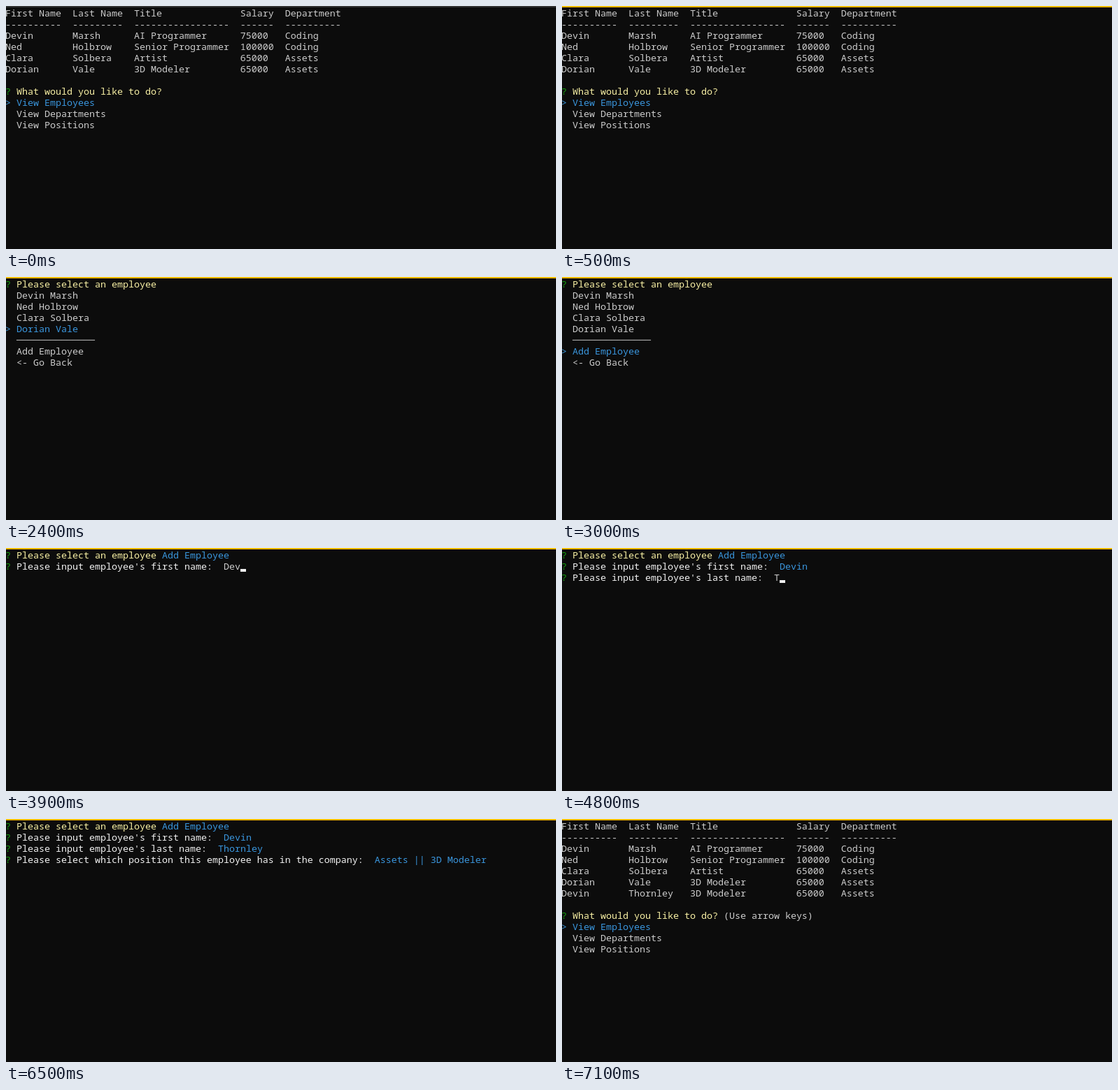
Recreate the animation shown at these times as an HTML page. Size 786 by 348 pixels, loop 7.2 s.

```html
<!DOCTYPE html>
<html lang="en">
<head>
<meta charset="utf-8">
<title>Employee terminal</title>
<style>
  html, body { margin: 0; width: 100%; height: 100%; overflow: hidden; background: #0c0c0c; }
  #edge { position: absolute; top: 0; left: 0; width: 100%; height: 2px; }
  #screen {
    position: absolute; top: 2px; left: -1px; margin: 0; color: #ccc;
    font: 13.3333px/16px "Noto Sans Mono", "DejaVu Sans Mono", monospace;
    font-variant-ligatures: none;
  }
  .mark { color: #13a10e; }
  .ask { color: #f9f1a5; }
  .field { color: #f2f2f2; }
  .pick { color: #3a96dd; }
  .cursor { display: inline-block; width: 8px; height: 4px; background: #f2f2f2; vertical-align: -3px; }
</style>
</head>
<body>
<div id="edge"></div>
<pre id="screen"></pre>
<script>
const LOOP = 7200;
const edge = document.getElementById('edge');
const screen = document.getElementById('screen');

const staff = [
  ['Devin', 'Marsh', 'AI Programmer', '75000', 'Coding'],
  ['Ned', 'Holbrow', 'Senior Programmer', '100000', 'Coding'],
  ['Clara', 'Solbera', 'Artist', '65000', 'Assets'],
  ['Dorian', 'Vale', '3D Modeler', '65000', 'Assets'],
];
const first = 'Devin', last = 'Thornley';
const hired = [first, last, '3D Modeler', '65000', 'Assets'];
const heads = ['First Name', 'Last Name', 'Title', 'Salary', 'Department'];
const widths = [10, 9, 17, 6, 10];

const menu = ['View Employees', 'View Departments', 'View Positions'];
const people = [...staff.map(p => p[0] + ' ' + p[1]), '─'.repeat(14), 'Add Employee', '<- Go Back'];
const positions = [
  ...['Artist', '3D Modeler', 'Sound Designer', 'Composer', 'Senior Asset Lead'].map(p => 'Assets || ' + p),
  ...['Programmer', 'AI Programmer'].map(p => 'Coding || ' + p),
];

// Times at which the list selection moves and letters are typed
const moves = [1800, 2000, 2300, 2500, 2700, 2900];
const stops = [0, 1, 2, 3, 5, 6, 5];
const firstKeys = [3600, 3800, 3900, 4000, 4100];
const lastKeys = [4600, 5000, 5100, 5200, 5300, 5400, 5500, 5600];

const passed = (times, t) => times.filter(x => x <= t).length;
const esc = s => s.replace(/</g, '&lt;').replace(/>/g, '&gt;');
const span = (cls, s) => `<span class="${cls}">${esc(s)}</span>`;
const prompt = (s, cls = 'field') => span('mark', '?') + ' ' + span(cls, s);
const hint = on => on ? '(Use arrow keys)' : '';
const list = (items, sel) => items.map((s, i) => i === sel ? span('pick', '> ' + s) : '  ' + esc(s));
const row = cells => cells.map((c, i) => c.padEnd(widths[i])).join('  ');

function home(rows, showHint) {
  return [row(heads), row(widths.map(w => '-'.repeat(w))), ...rows.map(row), '',
    prompt('What would you like to do?', 'ask') + ' ' + hint(showHint), ...list(menu, 0)];
}

function entry(label, name, keys, end, t) {
  const text = name.slice(0, passed(keys, t));
  return prompt(label) + '  ' + (t < end ? text + span('cursor', '') : span('pick', name));
}

function lines(t) {
  if (t < 1300) return home(staff, false);
  if (t >= 7100) return home([...staff, hired], true);

  const select = prompt('Please select an employee', 'ask') + ' ';
  if (t < 3200) {
    const n = passed(moves, t);
    return [select + hint(n === 0), ...list(people, stops[n])];
  }

  const out = [select + span('pick', 'Add Employee'),
    entry("Please input employee's first name:", first, firstKeys, 4400, t)];
  if (t >= 4400) out.push(entry("Please input employee's last name:", last, lastKeys, 5700, t));
  if (t >= 5700) {
    const ask = prompt('Please select which position this employee has in the company:') + '  ';
    if (t >= 6300) out.push(ask + span('pick', positions[1]));
    else out.push(ask + hint(t < 6000), ...list(positions, t < 6000 ? 0 : 1),
      '(Move up and down to reveal more choices)');
  }
  return out;
}

let shown;
function draw() {
  const t = performance.now() % LOOP;
  const html = lines(t).join('\n');
  if (html !== shown) screen.innerHTML = shown = html;
  edge.style.background = t < 100 ? '#333' : '#ffb900';
  requestAnimationFrame(draw);
}
draw();
</script>
</body>
</html>
```
